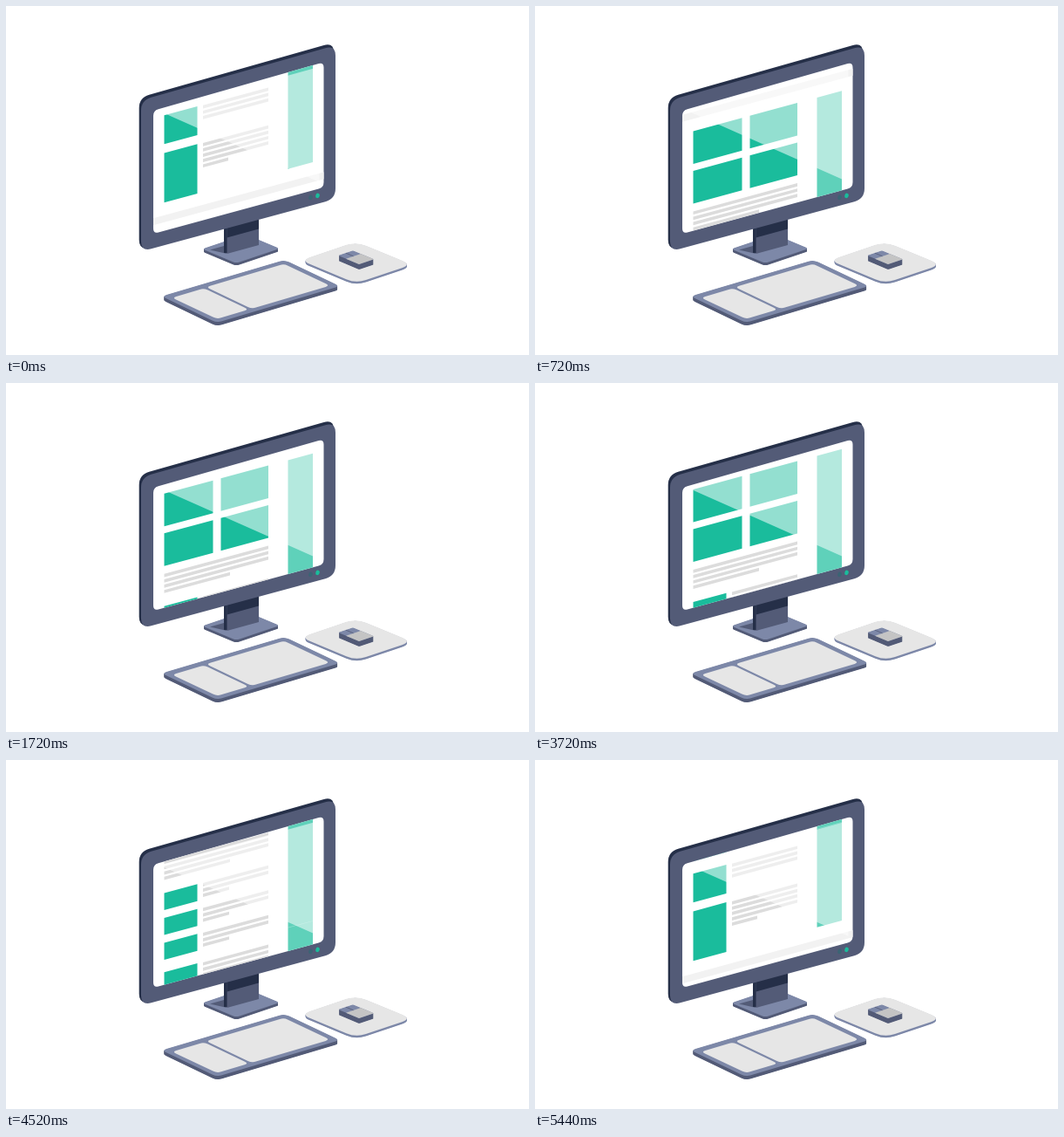
An HTML page with a canvas that plays this animation: 600 px wide and 400 px high, repeating every 5480 ms.

```html
<!DOCTYPE html>
<html lang="en">
<head>
<meta charset="utf-8">
<title>Desktop scrolling</title>
<style>
  html, body { margin: 0; width: 100%; height: 100%; overflow: hidden; background: #fff; }
  canvas { display: block; width: 600px; height: 400px; }
</style>
</head>
<body>
<canvas id="stage" width="600" height="400"></canvas>
<script>
const ctx = document.getElementById('stage').getContext('2d');

const LOOP = 5480, STEP = 40;
const TURN = 1260, REST = 1720, LEAVE = 3680;
const REST_Y = 127, SPEED_DOWN = 0.123, SPEED_WRAP = 0.1645;
const PAGE_HEIGHT = 356.4;

const SLOPE = 0.271, TOP_SLOPE = 0.283;
const NAVY = '#252f48', SLATE = '#535b77', STEEL = '#7d88a8', PALE = '#e6e6e6';
const GREEN = '#1abc9c', MINT = '#5fd1ba', TEXT = '#dcdcdc', BAR = '#f2f2f2';

const lerp = (a, b, t) => a + (b - a) * t;

// Closed path whose corners are cut by the given length and curved
function trace(points, cut = 0) {
  const toward = ([x, y], [x2, y2]) => {
    const t = cut / Math.hypot(x2 - x, y2 - y);
    return [lerp(x, x2, t), lerp(y, y2, t)];
  };
  const n = points.length;
  ctx.beginPath();
  points.forEach((p, i) => {
    ctx.lineTo(...toward(p, points[(i + n - 1) % n]));
    ctx.quadraticCurveTo(...p, ...toward(p, points[(i + 1) % n]));
  });
  ctx.closePath();
}

function fill(color, points, cut) {
  trace(points, cut);
  ctx.fillStyle = color;
  ctx.fill();
}

// Flat tile from its left corner: a runs up to the right, b down to the right
function tile(x, y, a, b, up = 0.335, down = 0.415) {
  return [[x, y], [x + a, y - a * up],
          [x + a + b, y - a * up + b * down], [x + b, y + b * down]];
}

// Upright panel receding to the right
function panel(x, width, top, bottom, topSlope = SLOPE) {
  return [[x, top], [x + width, top - width * topSlope],
          [x + width, bottom - width * SLOPE], [x, bottom]];
}

function slab(top, side, points, cut, depth) {
  for (let d = depth; d > 0; d -= 0.5) {
    fill(side, points.map(([x, y]) => [x, y + d]), cut);
  }
  fill(top, points, cut);
}

function dot(color, x, y) {
  ctx.beginPath();
  ctx.ellipse(x, y, 2.2, 2.8, 0.3, 0, Math.PI * 2);
  ctx.fillStyle = color;
  ctx.fill();
}

function box(color, x1, x2, y, height) {
  ctx.fillStyle = color;
  ctx.fillRect(x1, y, x2 - x1, height);
}

function textLines(x, y, full, shortEnd) {
  for (let i = 0; i < full; i++) box(TEXT, x, 301, y + i * 6.1, 3.7);
  if (shortEnd) box(TEXT, x, shortEnd, y + full * 6.1, 3.7);
}

function card(y, height, full, shortEnd) {
  box(GREEN, 181.5, 219.5, y, height);
  textLines(226, y + 0.6, full, shortEnd);
}

function drawPage(y) {
  ctx.save();
  ctx.transform(1, -SLOPE, 0, 1, 0, SLOPE * 181 + y);
  box(BAR, 165, 368, -22, 8);

  for (const top of [0, 45.5]) {
    box(GREEN, 181.5, 237.5, top, 37.5);
    box(GREEN, 246.5, 301, top, 37.5);
  }
  textLines(181.5, 92, 3, 257);

  for (let i = 0; i < 3; i++) card(129 + i * 28.5, 19.5, 2, 256);
  card(219.8, 33, 3);
  card(263, 56.8, 4, 255);

  box(MINT, 323.5, 352, 0, 319.8);
  box('rgba(255,255,255,.3)', 323.5, 352, 206.8, 0.6);
  ctx.restore();
}

function drawStand() {
  slab(STEEL, SLATE, tile(225, 278.5, 50, 39), 4, 3);
  fill(SLATE, [[234, 279.5], [250, 275], [253.5, 284]]);
  box(NAVY, 250, 254, 250, 33);
  fill(SLATE, panel(253.5, 36.5, 250, 284));
  fill(NAVY, panel(253.5, 36.5, 250, 265.5));
}

function drawKeyboard() {
  const key = (x, y, a, b) => tile(x, y, a, b, 0.297, 0.475);
  slab(STEEL, SLATE, key(178.5, 332.8, 141, 63.5), 6, 4);
  fill(PALE, key(190.5, 334.3, 36.5, 51.5), 5);
  fill(PALE, key(229.5, 322.1, 89.5, 52.5), 5);
}

function drawMouse() {
  slab(PALE, STEEL, tile(338, 291.5, 64, 63.5), 12, 2.5);
  slab(STEEL, SLATE, tile(381.2, 286, 17, 24), 1.5, 6);
  fill('#c4c4c4', tile(390, 289.7, 17, 15));
  ctx.strokeStyle = SLATE;
  ctx.lineWidth = 0.8;
  ctx.beginPath();
  ctx.moveTo(390, 283.2);
  ctx.lineTo(398.5, 286.8);
  ctx.stroke();
}

function drawMonitor(scroll) {
  fill(NAVY, panel(152.7, 223.5, 105, 280, TOP_SLOPE), 12);
  fill(SLATE, panel(155, 223, 108, 281.5, TOP_SLOPE), 12);
  dot('#3a6474', 349.5, 219.4);
  dot(GREEN, 357.5, 217.4);

  const screen = panel(169, 195.5, 119.8, 261, TOP_SLOPE);
  fill('#fff', screen, 6);
  ctx.save();
  trace(screen, 6);
  ctx.clip();
  for (const page of [-1, 0, 1]) drawPage(scroll + page * PAGE_HEIGHT);
  // Fixed glare on the glass
  fill('rgba(255,255,255,.53)', [[176, 120.4], [359.5, 69.8], [359.5, 201.8]]);
  ctx.restore();
}

// Scroll down past the page end, overshoot the top, come back and rest
function scrollAt(time) {
  const wrapY = REST_Y - (LOOP - LEAVE) * SPEED_DOWN + PAGE_HEIGHT;
  const turnY = wrapY - TURN * SPEED_WRAP;
  if (time < TURN) return wrapY - time * SPEED_WRAP;
  if (time < REST) return lerp(turnY, REST_Y, (time - TURN) / (REST - TURN));
  return REST_Y - Math.max(0, time - LEAVE) * SPEED_DOWN * (time > LEAVE);
}

const start = performance.now();

function render() {
  const elapsed = (performance.now() - start) % LOOP;
  const time = Math.floor(elapsed / STEP) * STEP;
  ctx.fillStyle = '#fff';
  ctx.fillRect(0, 0, 600, 400);
  drawStand();
  drawKeyboard();
  drawMouse();
  drawMonitor(time >= REST && time < LEAVE + STEP ? REST_Y : scrollAt(time));
  requestAnimationFrame(render);
}

render();
</script>
</body>
</html>
```
